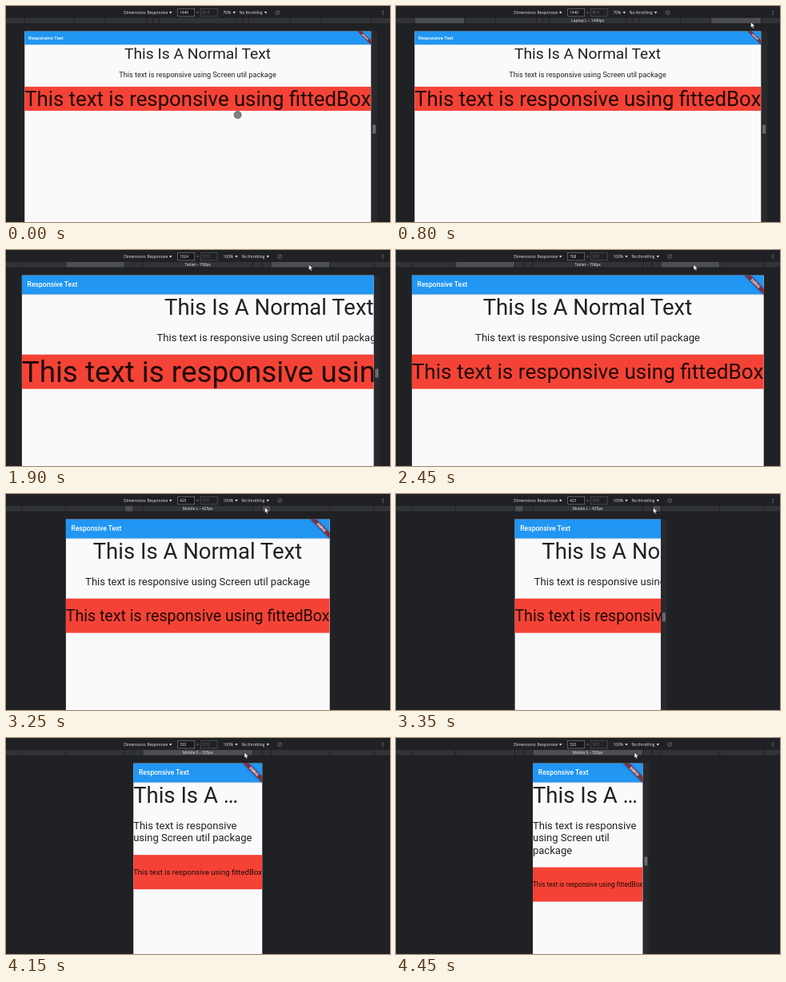
These frames come from a looping animation (480 px wide and 270 px high, 4500 ms). An HTML page:

```html
<!DOCTYPE html>
<html lang="en">
<head>
<meta charset="utf-8">
<title>Responsive Text</title>
<style>
html, body { margin: 0; width: 100%; height: 100%; overflow: hidden; background: #202124; }
svg { display: block; }
#stage { width: 100vw; height: 100vh; }
#tools text, #label { font: 4.85px "Open Sans", sans-serif; fill: #e8eaed; }
#tools .dim { fill: #6b6e72; }
#app text { font-family: Roboto, sans-serif; fill: #000; fill-opacity: .87; }
#app .white { fill: #fff; fill-opacity: 1; }
</style>
</head>
<body>
<svg id="stage" viewBox="0 0 480 270">
  <defs>
    <filter id="blur" x="-20%" y="-80%" width="140%" height="260%"><feGaussianBlur stdDeviation="2.6"/></filter>
    <path id="tri" d="M-1.7 -1.4H1.7L0 1.5Z" fill="#dadce0"/>
  </defs>
  <rect width="480" height="270" fill="#202124"/>
  <g id="tools">
    <text x="147.3" y="10">Dimensions: Responsive</text>
    <use href="#tri" x="205.7" y="8.3"/>
    <rect x="214.7" y="3.3" width="21" height="9.6" fill="#18191b" stroke="#77797c" stroke-width=".7"/>
    <text id="wide" x="217" y="10"></text>
    <text x="239.6" y="10" text-anchor="middle" style="fill:#9aa0a6">×</text>
    <rect x="243.2" y="3.3" width="21" height="9.6" fill="#202124" stroke="#55575a" stroke-width=".7"/>
    <text id="high" class="dim" x="245.6" y="10"></text>
    <text id="zoom" x="271.6" y="10"></text>
    <g id="rest">
      <use href="#tri" x="285.3" y="8.3"/>
      <text x="291.8" y="10">No throttling</text>
      <use href="#tri" x="324.6" y="8.3"/>
      <g fill="none" stroke="#85888c" stroke-width=".6">
        <circle cx="339.6" cy="8.2" r="2.4"/>
        <path d="M338 9.8L341.2 6.6"/>
      </g>
    </g>
    <g fill="#bdc1c6">
      <circle cx="471" cy="6.2" r=".55"/><circle cx="471" cy="8.2" r=".55"/><circle cx="471" cy="10.2" r=".55"/>
    </g>
  </g>
  <g id="ruler" stroke="#1d1e20" stroke-width=".8"></g>
  <text id="label" x="239.7" y="20.2" text-anchor="middle"></text>
  <g id="handle">
    <rect y="31.4" width="8" height="239" fill="#28292c"/>
    <path d="M2.9 148.5V159.5M4.9 148.5V159.5" stroke="#a5a7aa" stroke-width="1"/>
  </g>
  <svg id="page" y="31.4" height="239" overflow="hidden">
    <rect width="480" height="239" fill="#fafafa"/>
    <g id="app">
      <rect id="bar" height="56" fill="#2196f3"/>
      <rect id="shade" y="56" height="2" fill="#000" opacity=".14"/>
      <text class="white" x="16" y="35" font-size="20" font-weight="500">Responsive Text</text>
      <text id="head" font-size="64"></text>
      <g id="body" font-size="30.4"></g>
      <rect id="red" height="100" fill="#f44336"/>
      <text id="fit">This text is responsive using fittedBox</text>
      <g id="ribbon">
        <rect x="-40" y="28" width="80" height="12" opacity=".5" filter="url(#blur)"/>
        <rect x="-40" y="28" width="80" height="12" fill="#b71c1c" opacity=".63"/>
        <text class="white" y="37.6" font-size="10.2" font-weight="900" text-anchor="middle">DEBUG</text>
      </g>
    </g>
  </svg>
  <circle id="touch" r="4.6" fill="#808080" stroke="#6a6a6a" stroke-width=".8"/>
  <path id="arrow" d="M0 0V7.2L1.7 5.7 2.8 8.2 4 7.7 2.9 5.2H5.2Z" fill="#fff" stroke="#111" stroke-width=".5"/>
</svg>
<script>
const LOOP = 4500, STEP = 50, MID = 239.7, UNIT = 0.4297, TOP = 31.4;
const $ = id => document.getElementById(id);
const set = (el, attrs) => { for (const k in attrs) el.setAttribute(k, attrs[k]); };
const make = (tag, parent, attrs = {}) => {
  const el = document.createElementNS('http://www.w3.org/2000/svg', tag);
  set(el, attrs);
  return parent.appendChild(el);
};

// Each preset is picked at `t`, framed at `box` and laid out at `flow`.
const stages = [
  { t: 0, box: 0, flow: 0, w: 1440, z: 0.7 },
  { t: 1800, box: 1850, flow: 1950, w: 1024, z: 1 },
  { t: 2450, box: 2500, flow: 2550, w: 768, z: 1 },
  { t: 3250, box: 3300, flow: 3400, w: 425, z: 1 },
  { t: 3750, box: 3750, flow: 3900, w: 375, z: 1 },
  { t: 4150, box: 4200, flow: 4450, w: 320, z: 1 }
];
const at = (t, key) => stages.filter(s => s[key] <= t).pop();

const presets = [
  [2560, '4K'], [1440, 'Laptop L'], [1024, 'Laptop'], [768, 'Tablet'],
  [425, 'Mobile L'], [375, 'Mobile M'], [320, 'Mobile S']
];
const bars = presets.map(() => make('rect', $('ruler'), { y: 14.6, height: 7.4 }));

// Pointer moves: start, end, from x, y to x, y
const moves = [
  [200, 400, 419, 51, 452, 23],
  [500, 800, 452, 23, 443.5, 20],
  [1400, 1650, 443.5, 20, 380, 18],
  [1800, 2150, 380, 18, 372, 18],
  [2700, 3100, 372, 18, 323.5, 16.5],
  [3250, 3550, 323.5, 16.5, 316, 18],
  [3750, 4000, 316, 18, 298, 18]
];
const ease = p => p * p * (3 - 2 * p);

function pointer(t) {
  if (t < 50) return [289.6, 136];
  const m = moves.filter(m => m[0] <= t).pop();
  if (!m) return null;
  const p = ease(Math.min(1, (t - m[0]) / (m[1] - m[0])));
  return [m[2] + (m[4] - m[2]) * p, m[3] + (m[5] - m[3]) * p];
}

const pen = document.createElement('canvas').getContext('2d');
const measure = (text, size) => {
  pen.font = size + 'px Roboto, sans-serif';
  return pen.measureText(text).width;
};

function wrap(text, size, width) {
  const lines = [''];
  for (const word of text.split(' ')) {
    const last = lines.length - 1;
    const next = lines[last] ? lines[last] + ' ' + word : word;
    if (lines[last] && measure(next, size) > width) lines.push(word);
    else lines[last] = next;
  }
  return lines;
}

let laid = 0;
function layout(w) {
  if (w === laid) return;
  laid = w;
  const title = 'This Is A Normal Text', long = measure(title, 64);
  $('head').textContent = long > w ? 'This Is A …' : title;
  set($('head'), { x: Math.max(0, (w - long) / 2), y: 56 + 59.4 });

  const lines = wrap('This text is responsive using Screen util package', 30.4, w);
  $('body').replaceChildren();
  lines.forEach((line, i) => {
    const x = lines.length > 1 ? 0 : (w - measure(line, 30.4)) / 2;
    make('text', $('body'), { x, y: 163 + 28.4 + 36 * i }).textContent = line;
  });

  const y = 163 + 36 * lines.length + 32;
  const size = 100 * w / measure($('fit').textContent, 100);
  set($('red'), { y, width: w });
  set($('fit'), { y: y + 50 + 0.342 * size, 'font-size': size });
  set($('bar'), { width: w });
  set($('shade'), { width: w });
  set($('ribbon'), { transform: `translate(${w} 0) rotate(45)` });
}

function drawTools(s) {
  $('wide').textContent = s.w;
  $('high').textContent = Math.round(570 / s.z);
  $('zoom').textContent = Math.round(s.z * 100) + '%';
  set($('rest'), { transform: `translate(${s.z < 1 ? 0 : 2.7} 0)` });
  set($('handle'), { transform: `translate(${MID + s.w * s.z * UNIT / 2} 0)` });
}

function drawRuler(s, pos) {
  const half = i => presets[i][0] * s.z * UNIT / 2;
  let hover = -1;
  if (pos && pos[1] < 22) presets.forEach((p, i) => {
    if (Math.abs(pos[0] - MID) < half(i)) hover = i;
  });
  bars.forEach((bar, i) => set(bar, {
    x: MID - half(i), width: 2 * half(i), fill: i === hover ? '#4d4e51' : '#323336'
  }));
  $('label').textContent = hover < 0 ? '' : `${presets[hover][1]} – ${presets[hover][0]}px`;
}

function drawPointer(pos) {
  const inPage = pos && pos[1] > TOP;
  const place = pos ? `translate(${pos[0]} ${pos[1]})` : '';
  set($('touch'), { transform: place, visibility: inPage ? 'visible' : 'hidden' });
  set($('arrow'), { transform: place, visibility: pos && !inPage ? 'visible' : 'hidden' });
}

function draw(t) {
  const tool = at(t, 't'), box = at(t, 'box'), pos = pointer(t);
  const width = box.w * box.z * UNIT;
  drawTools(tool);
  drawRuler(tool, pos);
  set($('page'), { x: MID - width / 2, width });
  set($('app'), { transform: `scale(${UNIT * box.z})` });
  layout(at(t, 'flow').w);
  drawPointer(pos);
}

const start = performance.now();
function tick() {
  const t = (performance.now() - start) % LOOP;
  draw(Math.floor(t / STEP) * STEP);
  requestAnimationFrame(tick);
}
tick();
</script>
</body>
</html>
```
